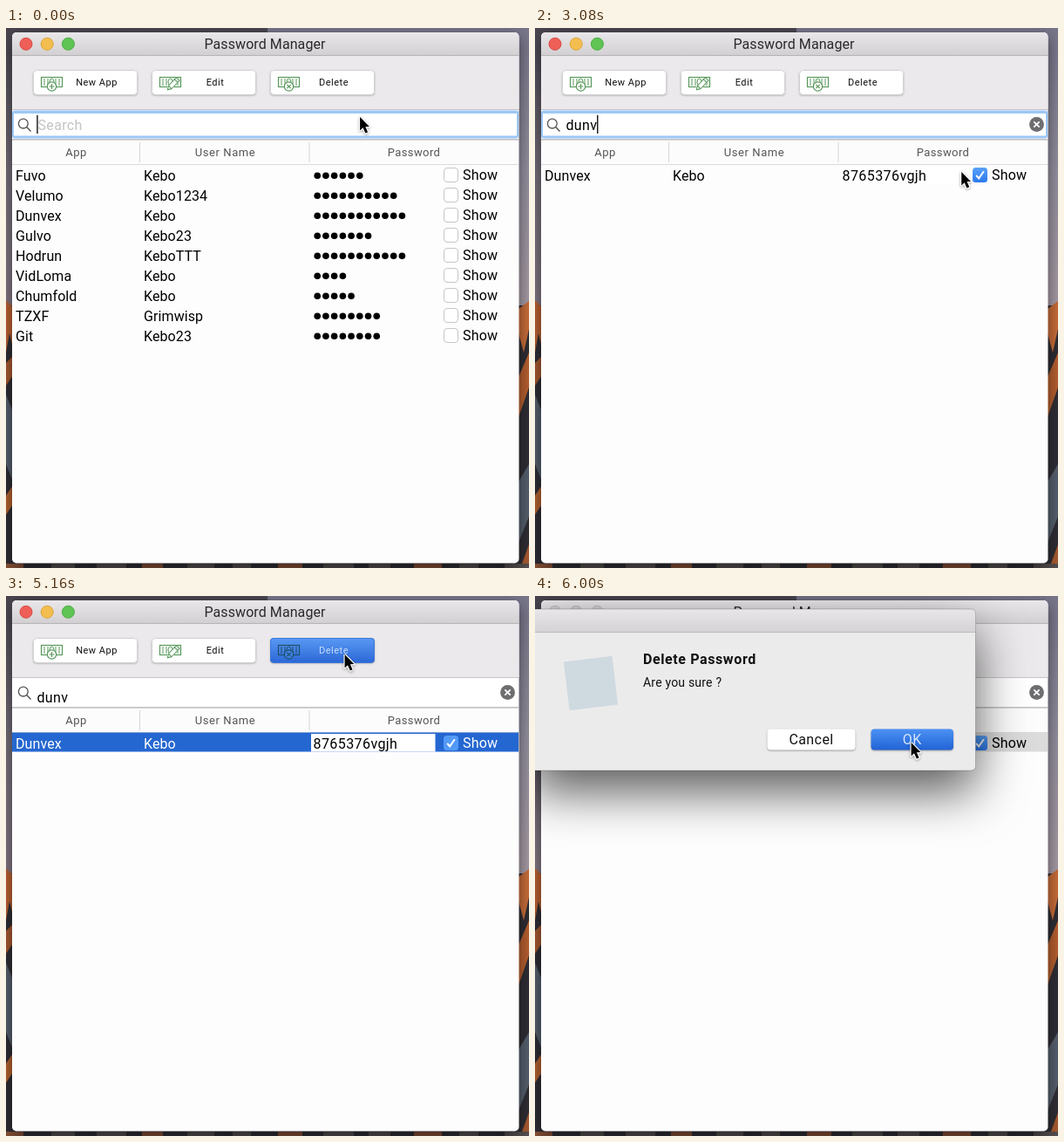
Animation, 600 px wide and 619 px high, one loop 6040 ms. Source, as an HTML page with a canvas:

```html
<!DOCTYPE html>
<html lang="en">
<head>
<meta charset="utf-8">
<title>Password Manager</title>
<style>
html, body { margin: 0; width: 100%; height: 100%; overflow: hidden; background: #3a383f; }
canvas { display: block; }
</style>
</head>
<body>
<canvas id="stage" width="600" height="619"></canvas>
<script>
const W = 600, H = 619, LOOP = 6040;
const stage = document.getElementById('stage').getContext('2d');
const layer = document.createElement('canvas');
layer.width = W;
layer.height = H;
const layerCtx = layer.getContext('2d');
let c = stage;

const QUERY = 'dunv';
const KEYS = [400, 560, 720, 880];
const CHECK = 2520, SELECT = 3520, PRESS = 4720, ALERT = 5200, CONFIRM = 5880;
const ROWS = [
  ['Fuvo', 'Kebo', 6], ['Velumo', 'Kebo1234', 10], ['Dunvex', 'Kebo', 11],
  ['Gulvo', 'Kebo23', 7], ['Hodrun', 'KeboTTT', 11], ['VidLoma', 'Kebo', 4],
  ['Chumfold', 'Kebo', 5], ['TZXF', 'Grimwisp', 8], ['Git', 'Kebo23', 8]
];
// pointer moves: start, end, x, y
const MOVES = [
  [1500, 2200, 517, 163], [2800, 3400, 454, 165],
  [4000, 4640, 388, 66], [5440, 5800, 431, 167]
];

function text(s, x, y, size = 16, color = '#000', align = 'left', space = 0.1, weight = 400) {
  c.font = `${weight} ${size}px Roboto, Inter, sans-serif`;
  c.letterSpacing = space + 'px';
  c.textAlign = align;
  c.fillStyle = color;
  c.fillText(s, x, y);
}
function rect(x, y, w, h, color) {
  c.fillStyle = color;
  c.fillRect(x, y, w, h);
}
function round(x, y, w, h, r, fill, stroke) {
  c.beginPath();
  c.roundRect(x, y, w, h, r);
  if (fill) { c.fillStyle = fill; c.fill(); }
  if (stroke) { c.strokeStyle = stroke; c.lineWidth = 1; c.stroke(); }
}
function disc(x, y, r, fill, stroke, lw = 1) {
  c.beginPath();
  c.arc(x, y, r, 0, 7);
  if (fill) { c.fillStyle = fill; c.fill(); }
  if (stroke) { c.strokeStyle = stroke; c.lineWidth = lw; c.stroke(); }
}
function line(color, lw, ...p) {
  c.beginPath();
  for (let i = 0; i < p.length; i += 2) c.lineTo(p[i], p[i + 1]);
  c.strokeStyle = color;
  c.lineWidth = lw;
  c.stroke();
}
function poly(fill, ...p) {
  c.beginPath();
  for (let i = 0; i < p.length; i += 2) c.lineTo(p[i], p[i + 1]);
  c.closePath();
  c.fillStyle = fill;
  c.fill();
}
function fade(y0, y1, ...colors) {
  const g = c.createLinearGradient(0, y0, 0, y1);
  colors.forEach((k, i) => g.addColorStop(i / (colors.length - 1), k));
  return g;
}
function shadow(color, blur, y) {
  c.shadowColor = color;
  c.shadowBlur = blur;
  c.shadowOffsetY = y;
}
function noShadow() { shadow('transparent', 0, 0); }

function backdrop() {
  rect(0, 0, 300, H, fade(0, 330, '#4a454f', '#77707c', '#857986'));
  rect(300, 0, 300, H, fade(0, 330, '#77758a', '#9591a0', '#a99ca6'));
  rect(0, 318, W, 301, '#2f2e35');
  poly('#bd6332', 0, 312, 8, 320, 8, 366, 4, 350, 0, 372);
  poly('#a85a30', 0, 384, 8, 376, 8, 398, 0, 410);
  poly('#56606e', 0, 420, 8, 440, 8, 520, 0, 500);
  poly('#b5632f', 0, 536, 8, 524, 8, 546, 0, 558);
  poly('#c96d39', 588, 322, 600, 313, 600, 345, 594, 372, 588, 350);
  poly('#b8602f', 588, 400, 600, 372, 600, 412, 588, 446);
  poly('#56606e', 588, 520, 600, 500, 600, 560, 588, 590);
  poly('#a85a30', 590, 619, 600, 592, 600, 619);
  for (let i = 0; i < 12; i++) {
    rect(i * 52, 614, 20 + i * 7 % 17, 5, i % 3 ? '#55504f' : '#8a5236');
  }
}

function note(x, color) {
  c.strokeStyle = color;
  c.lineWidth = 1.2;
  c.strokeRect(x + 0.5, 56.5, 24, 11);
  for (const d of [4, 8, 17, 21]) line(color, 1, x + d, 58, x + d, 66);
  c.beginPath();
  c.ellipse(x + 12.5, 62, 2.5, 4, 0, 0, 7);
  c.stroke();
}
function badge(x, bg, color, turn) {
  disc(x, 67, 5.2, bg, color, 1.2);
  c.save();
  c.translate(x, 67);
  c.rotate(turn);
  line(color, 1.2, -3, 0, 3, 0);
  line(color, 1.2, 0, -3, 0, 3);
  c.restore();
}
function toolButton(x, label, down) {
  shadow('rgba(0,0,0,.28)', 2, 1);
  round(x, 48, 120, 28.5, 4, down ? fade(48, 77, '#5a9af4', '#2a66d6') : '#fff');
  noShadow();
  round(x + 0.5, 48.5, 119, 28, 4, null, down ? '#3f78d8' : '#d2d0d2');
  text(label, x + 73, 66, 11, down ? '#c9ddfb' : '#111', 'center', 0.5);
  const green = down ? '#1d4f6a' : '#58985a', bg = down ? '#3f7fe4' : '#fff';
  note(x + 9, green);
  if (label === 'Edit') {
    c.save();
    c.translate(x + 24, 65);
    c.rotate(-0.8);
    c.fillStyle = bg;
    c.strokeStyle = green;
    c.fillRect(-6, -3, 15, 6);
    c.strokeRect(-4, -2.5, 13, 5);
    line(green, 1.1, -4, -2.5, -8, 0, -4, 2.5);
    line(green, 1, 6, -2.5, 6, 2.5);
    c.restore();
  } else {
    badge(x + 21.5, bg, green, label === 'Delete' ? Math.PI / 4 : 0);
  }
}

function searchBar(t, typed) {
  const focus = t < SELECT;
  rect(7, 93, 581, 35, '#c6c4c6');
  rect(7, 94, 581, 33, '#fff');
  if (focus) {
    round(7, 94.5, 581, 32, 3, '#9cc7f6');
    rect(9, 98, 577, 25.5, '#fff');
  }
  disc(19.8, 109.6, 5.4, null, '#555', 1.3);
  line('#555', 1.5, 23.7, 113.5, 28.5, 118.5);
  if (typed) {
    text(typed, 35.5, focus ? 117 : 122, 16, '#000', 'left', 0.35);
    disc(575.5, 110.5, 8.4, '#6e6d6f');
    line('#fff', 1.8, 572.3, 107.3, 578.7, 113.7);
    line('#fff', 1.8, 578.7, 107.3, 572.3, 113.7);
  } else {
    text('Search', 36.5, 117, 16, '#c4c3c5', 'left', 0.35);
  }
  if (focus) {
    c.font = '16px Roboto, Inter, sans-serif';
    c.letterSpacing = '0.35px';
    const x = 35.3 + (typed ? c.measureText(typed).width : 0);
    rect(x, 100, 1.3, 21, '#000');
  }
}

function checkbox(x, y, on, light) {
  if (!on) {
    round(x + 0.5, y + 0.5, 16, 16, 3.5, '#fff', '#c6c5c7');
    return;
  }
  round(x, y, 17, 17, 3.5, light ? '#5399f8' : fade(y, y + 17, '#5aa2f8', '#2c78ee'));
  line('#fff', 1.9, x + 4.2, y + 9, x + 7.2, y + 12.4, x + 12.8, y + 4.2);
}

function table(t, typed) {
  rect(7, 128, 581, 28, '#fdfcfd');
  rect(7, 128, 581, 1, '#d5d3d5');
  rect(7, 156, 581, 1, '#dcdadc');
  rect(153, 131, 1, 23, '#d6d4d6');
  rect(347.5, 131, 1, 23, '#d6d4d6');
  text('App', 80.5, 147, 13, '#555', 'center', 0.5);
  text('User Name', 251.5, 147, 13, '#555', 'center', 0.6);
  text('Password', 468, 147, 13, '#555', 'center', 0.4);

  const shown = t >= CHECK, chosen = t >= SELECT, dim = t >= ALERT;
  ROWS.filter(r => r[0].toLowerCase().startsWith(typed)).forEach(([app, user, n], i) => {
    const y = 157 + 23 * i, ink = chosen && !dim ? '#fff' : '#000';
    if (chosen) rect(7, y - 0.5, 581, 22, dim ? '#dcdbdc' : '#2567d1');
    text(app, 11, y + 18, 16, ink);
    text(user, 158, y + 18, 16, ink);
    if (shown) {
      rect(350, y + 1, 142.5, 20.5, dim ? '#dcdbdc' : '#fff');
      text('8765376vgjh', 352.5, y + 18, 16, '#000', 'left', 0.42);
    } else {
      for (let k = 0; k < n; k++) disc(357.2 + 9.72 * k, y + 12.2, 3.8, '#000');
    }
    checkbox(502, y + 3, shown, chosen && !dim);
    text('Show', 524, y + 17, 16, ink, 'left', 0.2);
  });
}

function mainWindow(t) {
  const typed = QUERY.slice(0, KEYS.filter(k => t >= k).length);
  shadow('rgba(0,0,0,.55)', 18, 6);
  round(7, 5, 581.5, 608.5, 5, '#fefdfe');
  noShadow();
  c.save();
  c.beginPath();
  c.roundRect(7, 5, 581.5, 608.5, 5);
  c.clip();
  rect(7, 5, 582, 27, fade(5, 31, '#e9e7e9', '#d2d0d2'));
  rect(7, 31, 582, 1, '#b6b4b6');
  rect(7, 32, 582, 61, '#ebe9eb');
  const lights = t >= ALERT ? ['#d0ced0', '#d0ced0', '#d0ced0'] : ['#ee5f57', '#f4be4f', '#5fc454'];
  const rims = t >= ALERT ? ['#bbb9bb', '#bbb9bb', '#bbb9bb'] : ['#dc4c45', '#dda53b', '#4bae41'];
  lights.forEach((k, i) => disc(23 + 24.2 * i, 18.3, 7, k, rims[i]));
  text('Password Manager', 297, 24, 16, '#2b2a2b', 'center', 0.08);
  toolButton(31, 'New App');
  toolButton(167, 'Edit');
  toolButton(303, 'Delete', t >= PRESS);
  searchBar(t, typed);
  table(t, typed);
  c.restore();
}

function alertButton(x, w, label, fill, ink) {
  shadow('rgba(0,0,0,.35)', 2, 1);
  round(x, 152.5, w, 24, 4, fill);
  noShadow();
  text(label, x + w / 2, 170, 16, ink, 'center', 0.4);
}

function alertBox(t) {
  const u = Math.min(1, (t - ALERT) / 200);
  const scale = 1 + 0.14 * (1 - u);
  c = layerCtx;
  c.clearRect(0, 0, W, H);
  c.save();
  c.translate(253, 107.5);
  c.scale(scale, scale);
  c.translate(-253, -107.5);
  shadow('rgba(0,0,0,.65)', 56, 24);
  round(-4, 15, 509.5, 185, 5, '#ecebec');
  noShadow();
  round(-4, 15, 509.5, 26, [5, 5, 0, 0], fade(15, 41, '#e8e6e8', '#d5d3d5'));
  rect(-4, 41, 509.5, 1, '#bbb9bb');
  round(-3.5, 15, 509, 185, 5, null, 'rgba(0,0,0,.2)');
  c.save();
  c.translate(64, 100);
  c.rotate(-0.12);
  rect(-28, -28, 56, 56, '#cfdae0');
  c.restore();
  text('Delete Password', 124, 78, 16, '#111', 'left', 0.6, 700);
  text('Are you sure ?', 124, 104, 14, '#111', 'left', 0.2);
  alertButton(266.5, 101, 'Cancel', '#fff', '#111');
  const blue = t >= CONFIRM ? ['#4d92f4', '#1f62d4'] : ['#66acfa', '#2a7af6'];
  alertButton(385.5, 94.5, 'OK', fade(152, 177, ...blue), t >= CONFIRM ? '#d6e5fc' : '#fff');
  c.restore();
  c = stage;
  c.globalAlpha = 1 - (1 - u) ** 3;
  c.drawImage(layer, 0, 0);
  c.globalAlpha = 1;
}

function pointer(t) {
  if (t >= KEYS[0] && t < 1400) return;
  let x = 405.5, y = 101;
  for (const [a, b, px, py] of MOVES) {
    const u = Math.max(0, Math.min(1, (t - a) / (b - a)));
    const e = u * u * (3 - 2 * u);
    x += (px - x) * e;
    y += (py - y) * e;
  }
  c.save();
  c.translate(x, y);
  if (t >= ALERT && t < 5400) {
    c.translate(1.5, 2);
    for (const [k, lw] of [['rgba(255,255,255,.7)', 3], ['#111', 1.4]]) {
      line(k, lw, -4, -9, -1, -9, 0, -7.5, 0, 7.5, -1, 9, -4, 9);
      line(k, lw, 4, -9, 1, -9, 0, -7.5, 0, 7.5, 1, 9, 4, 9);
    }
  } else {
    shadow('rgba(0,0,0,.35)', 3, 1);
    c.lineJoin = 'round';
    const shape = [0.6, 1, 0.6, 16.5, 4, 13.3, 6.8, 19.6, 9.6, 18.4, 6.9, 12.2, 11.4, 12];
    line('#fff', 2.4, ...shape, 0.6, 1);
    noShadow();
    poly('#000', ...shape);
  }
  c.restore();
}

function frame(now) {
  const t = Math.floor(now % LOOP / 40) * 40;
  c.clearRect(0, 0, W, H);
  backdrop();
  mainWindow(t);
  if (t >= ALERT) alertBox(t);
  pointer(t);
  requestAnimationFrame(frame);
}
requestAnimationFrame(frame);
</script>
</body>
</html>
```
